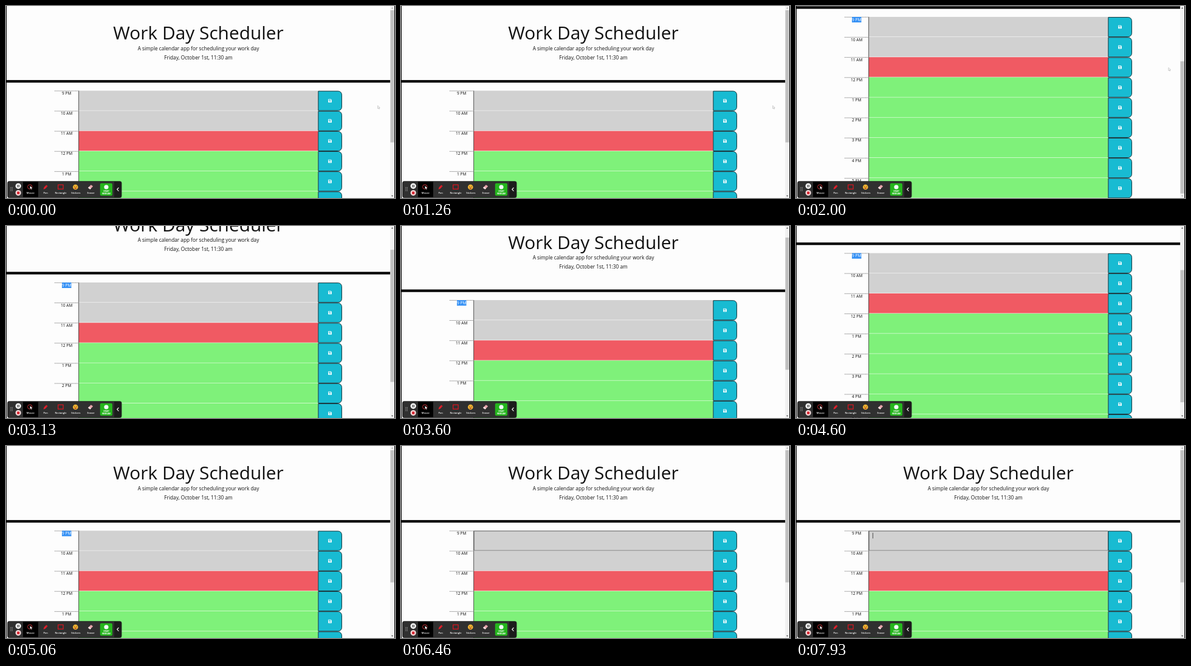
An HTML page with a canvas for the animation above (8000 ms loop, 640 px wide and 316 px high).

```html
<!DOCTYPE html>
<html lang="en">
<head>
<meta charset="utf-8">
<title>Day planner</title>
<style>
  html, body { margin: 0; width: 100%; height: 100%; overflow: hidden; background: #fdfdfd; }
  canvas { display: block; width: 640px; height: 316px; }
</style>
</head>
<body>
<canvas id="stage" width="640" height="316"></canvas>
<script>
const ctx = document.getElementById('stage').getContext('2d');
const W = 640, H = 316, LOOP = 8000;
const SANS = '"Open Sans", sans-serif';
const ROW = 33.15, FIRST = 139.4, MAX_SCROLL = 121.5;
const HOURS = ['9 PM', '10 AM', '11 AM', '12 PM', '1 PM', '2 PM', '3 PM', '4 PM', '5 PM'];
const PAST = '#d1d1d1', PRESENT = '#f05a63', FUTURE = '#7ff17a', TEAL = '#18bbd2';

// [time in ms, value]
const SCROLL = [[1780, 0], [1980, MAX_SCROLL], [2650, MAX_SCROLL], [3130, 46.5], [3600, 17.5],
                [3750, 8], [4330, 112], [4600, 95], [5030, 0]];
const CURSOR_Y = [[0, 164], [1600, 164], [1980, 101.5]];
const SELECT_FROM = 1300, FOCUS_FROM = 5900, CURSOR_GONE = 2500, BLINK = 530;

function track(keys, t) {
  if (t <= keys[0][0]) return keys[0][1];
  for (let i = 1; i < keys.length; i++) {
    const [t0, a] = keys[i - 1], [t1, b] = keys[i];
    if (t <= t1) return a + (b - a) * (t - t0) / (t1 - t0);
  }
  return keys[keys.length - 1][1];
}

function rect(x, y, w, h, color) {
  ctx.fillStyle = color;
  ctx.fillRect(x, y, w, h);
}

function text(str, x, y, size, color = '#111', weight = 400) {
  ctx.font = `${weight} ${size}px ${SANS}`;
  ctx.textAlign = 'center';
  ctx.fillStyle = color;
  ctx.fillText(str, x, y);
}

function circle(x, y, r, color) {
  ctx.beginPath();
  ctx.arc(x, y, r, 0, Math.PI * 2);
  ctx.fillStyle = color;
  ctx.fill();
}

function round(x, y, w, h, r, fill, stroke, line = 1) {
  ctx.beginPath();
  ctx.roundRect(x, y, w, h, r);
  if (fill) { ctx.fillStyle = fill; ctx.fill(); }
  if (stroke) { ctx.strokeStyle = stroke; ctx.lineWidth = line; ctx.stroke(); }
}

function poly(points, fill, stroke, line = 1, closed = true) {
  ctx.beginPath();
  points.forEach(([x, y]) => ctx.lineTo(x, y));
  if (closed) ctx.closePath();
  if (fill) { ctx.fillStyle = fill; ctx.fill(); }
  if (stroke) { ctx.strokeStyle = stroke; ctx.lineWidth = line; ctx.stroke(); }
}

function arrow(x, y, s, fill, stroke, line) {
  const shape = [[0, 0], [0, 6], [1.5, 4.7], [2.6, 7], [3.6, 6.5], [2.6, 4.4], [4.5, 4.3]];
  poly(shape.map(([a, b]) => [x + a * s, y + b * s]), fill, stroke, line);
}

function saveIcon(x, y) {
  poly([[x - 2.8, y - 2.8], [x + 1.6, y - 2.8], [x + 2.8, y - 1.6], [x + 2.8, y + 2.8], [x - 2.8, y + 2.8]], '#fff');
  rect(x - 1.9, y - 1.9, 3.2, 1.4, TEAL);
  circle(x, y + 1.1, 0.9, TEAL);
}

function header() {
  text('Work Day Scheduler', 316.5, 55.4, 29.83);
  text('A simple calendar app for scheduling your work day', 316.5, 72.8, 8.29);
  text('Friday, October 1st, 11:30 am', 316.5, 87.8, 8.29);
  rect(1, 121.9, 631, 4.2, '#000');
}

function hourRow(i, selected, focused, caret) {
  const y = FIRST + i * ROW;
  ctx.setLineDash([1, 0.7]);
  ctx.lineWidth = 0.8;
  ctx.strokeStyle = '#555';
  ctx.beginPath();
  ctx.moveTo(80, y + 0.4);
  ctx.lineTo(119.5, y + 0.4);
  ctx.stroke();
  ctx.setLineDash([]);

  if (selected) rect(92, y + 0.1, 15.5, 9, '#3390f5');
  text(HOURS[i], 99.7, y + 6.6, 6.63, selected ? '#fff' : '#111');

  rect(119.6, y, 394, ROW, i < 2 ? PAST : i === 2 ? PRESENT : FUTURE);
  rect(119.6, y + ROW - 0.7, 394, 0.8, 'rgba(255,255,255,.8)');
  rect(119.3, y, 0.8, ROW, '#333');
  if (focused) {
    round(120, y + 0.5, 393.5, ROW - 1, 0.5, null, '#555', 0.9);
    if (caret) rect(126, y + 3.4, 0.8, 9.4, '#333');
  }

  round(513.8, y + 0.7, 38.6, ROW - 1.1, [0, 6, 6, 0], TEAL, '#16343a', 1);
  saveIcon(533, y + 16.6);
}

function scrollbar(scroll) {
  rect(632, 0, 7, H, '#f1f1f1');
  rect(632.4, 7 + scroll * 0.692, 6.2, 217.5, '#c1c1c1');
  poly([[633.8, 4.2], [637.2, 4.2], [635.5, 2.2]], scroll > 0 ? '#505050' : '#a3a3a3');
  poly([[633.8, 311.8], [637.2, 311.8], [635.5, 313.8]], scroll < MAX_SCROLL ? '#505050' : '#a3a3a3');
}

function toolIcons() {
  // mouse
  ctx.beginPath();
  ctx.arc(39.3, 297.7, 3.7, 0, Math.PI * 2);
  ctx.strokeStyle = '#d9363c';
  ctx.lineWidth = 0.9;
  ctx.stroke();
  arrow(39.4, 295.8, 0.95, '#fff', '#000', 0.4);
  // pen
  poly([[61.6, 301.8], [62.4, 298.8], [66.2, 294.6], [68.6, 296.6], [64.6, 300.8]], '#e3202c');
  poly([[65.2, 295.6], [67.6, 297.7]], null, '#8c1219', 0.6, false);
  // rectangle
  ctx.strokeStyle = '#df1420';
  ctx.lineWidth = 1.2;
  ctx.strokeRect(85.7, 294.3, 8.4, 7);
  // sticker
  circle(114.3, 298, 4.3, '#f3b634');
  circle(112.7, 296.9, 0.7, '#5b3a12');
  circle(115.9, 296.9, 0.7, '#5b3a12');
  ctx.beginPath();
  ctx.arc(114.3, 298.6, 2.1, 0.15, Math.PI - 0.15);
  ctx.fillStyle = '#a5371f';
  ctx.fill();
  // eraser
  poly([[135, 299.2], [139.8, 294.2], [143.2, 296.8], [138.4, 301.8]], '#e7a3aa');
  poly([[135, 299.2], [136.6, 297.5], [140, 300.1], [138.4, 301.8]], '#f5e4e5');
}

function toolbar() {
  round(2.5, 288.7, 187.5, 26.6, 2.5, '#303030', '#151515', 0.8);
  rect(28, 289.3, 25, 25.3, '#000');
  round(178, 289, 11.6, 26, [0, 2.5, 2.5, 0], '#1c1c1c');

  for (let i = 0; i < 6; i++) rect(7.3 + (i % 2) * 2.4, 298.2 + (i >> 1) * 2.5, 1.2, 1.2, '#aaa');

  circle(20.2, 296.3, 4.6, '#fafafa');
  rect(18.4, 294.2, 1.2, 4.2, '#333');
  rect(20.8, 294.2, 1.2, 4.2, '#333');
  circle(20.2, 307.6, 4.6, '#f3dada');
  round(18.1, 305.5, 4.2, 4.2, 0.6, '#d8232f');

  toolIcons();
  ['Mouse', 'Pen', 'Rectangle', 'Stickers', 'Eraser'].forEach((name, i) =>
    text(name, 40.3 + i * 24.85, 309, 4, '#fff', 600));

  round(154.8, 291.8, 20.2, 20.4, 2, '#25b51d');
  circle(165, 298, 3.6, '#f4fbff');
  text('START', 165, 306.2, 3.2, '#fff', 700);
  text('WEBCAM', 165, 309.8, 3.2, '#fff', 700);

  poly([[185.4, 298.9], [182.8, 301.8], [185.4, 304.7]], null, '#fff', 1.2, false);
}

function draw(t) {
  const scroll = track(SCROLL, t);
  const focused = t >= FOCUS_FROM;
  const selected = t >= SELECT_FROM && !focused;
  const caret = focused && Math.floor((t - FOCUS_FROM) / BLINK) % 2 === 0 || t > 7700;

  rect(0, 0, W, H, '#fdfdfd');
  ctx.save();
  ctx.translate(0, -scroll);
  header();
  HOURS.forEach((_, i) => hourRow(i, i === 0 && selected, i === 0 && focused, caret));
  ctx.restore();

  scrollbar(scroll);
  rect(0, 0, 1, H, '#000');
  rect(639, 0, 1, H, '#000');
  if (t < CURSOR_GONE) arrow(611.6 + (t > 1800 ? 1.2 : 0), track(CURSOR_Y, t), 0.8, '#fff', '#aaa', 0.6);
  toolbar();
}

function frame(now) {
  draw(now % LOOP);
  requestAnimationFrame(frame);
}
requestAnimationFrame(frame);
</script>
</body>
</html>
```
